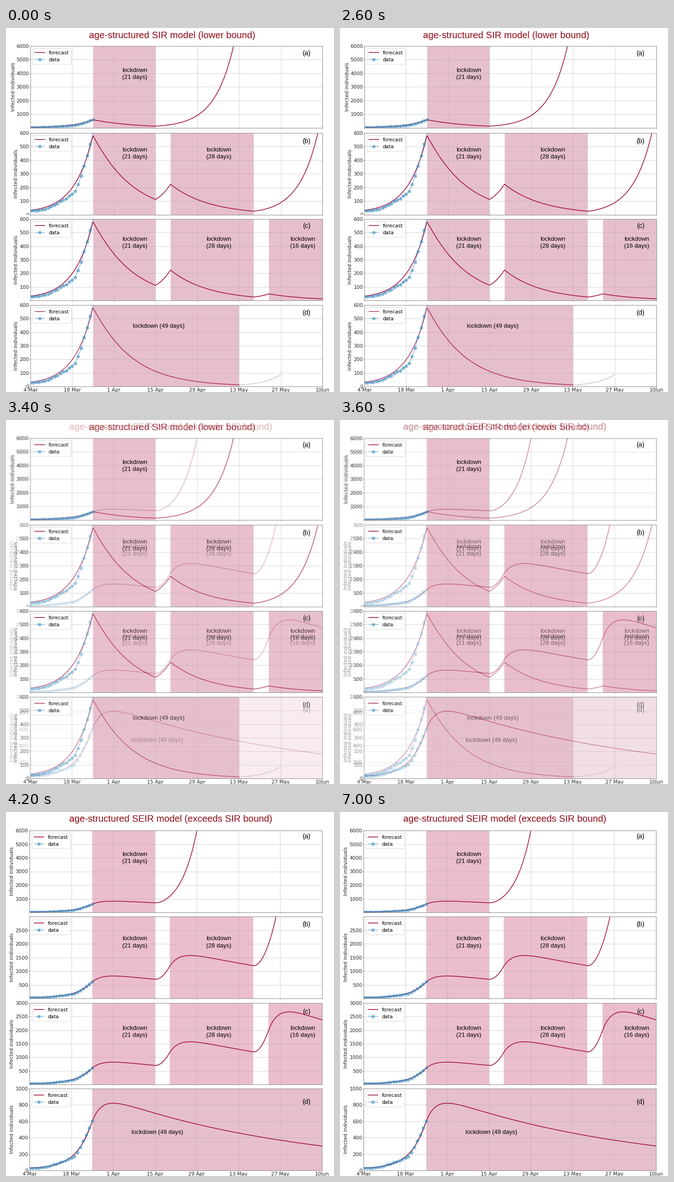
Recreate the animation shown at these times as a matplotlib script. Size 711 by 787 pixels, loop 7.2 s.

```python
import matplotlib.pyplot as plt
import numpy as np
from matplotlib.animation import FuncAnimation
from matplotlib.patches import Rectangle

W, H, DPI = 711, 787, 64
PT = 72 / DPI  # points per pixel
FRAMES, STEP = 72, 100
FADE_START, FADE_LENGTH = 3100, 1000

CRIMSON, BLUE, TITLE_RED, INK = "#a00f42", "#348abd", "#8e0814", "#222222"
PINK, ROSE = "#e6bfcd", "#ebbecc"
SMALL = 10.7 * PT

DATES = ["4 Mar", "18 Mar", "1 Apr", "15 Apr", "29 Apr", "13 May", "27 May", "10Jun"]
CASES = [28, 28, 29, 31, 36, 40, 48, 59, 71, 79, 97, 108, 116, 137,
         150, 172, 222, 283, 360, 434, 519, 606]

# Phase: (last day, growth rate, share of the main mode, decay of the rest)
SIR = [(21, .1555, .69, .1), (42, -.0812, 1.06, .3), (47, .156, .91, .3),
       (75, -.0782, 1, 0), (80, .154, .88, .3), (98, -.0782, 1, 0)]
SEIR = [(21, .19, .366, .05), (42, -.0152, 1.605, .3), (47, .182, .662, .4),
        (75, -.0152, 1.554, .3), (80, .172, .674, .4), (98, -.0152, 1.595, .3)]

fig = plt.figure(figsize=(W / DPI, H / DPI), dpi=DPI, facecolor="white")


def infected(start, phases):
    """Join exponential phases into one continuous curve."""
    days, values, day = [], [], 0
    for end, rate, share, decay in phases:
        t = np.linspace(0, end - day, 120)
        y = start * (share * np.exp(rate * t) + (1 - share) * np.exp(-decay * t))
        days.append(t + day)
        values.append(y)
        day, start = end, y[-1]
    return np.concatenate(days), np.concatenate(values)


def stretch(phases, count, end=98):
    """Keep the first phases and let the last one run on to the end day."""
    return phases[:count - 1] + [(end,) + phases[count - 1][1:]]


def label(x, y, text, size=13, color="black", **kw):
    fig.text(x / W, 1 - y / H, text, fontsize=size * PT, color=color, ha="center",
             **{"family": "Liberation Sans", "va": "baseline", **kw})


def lockdown(x, y, days):
    label(x, y, "lockdown")
    label(x, y + 15, f"({days} days)")


def panel(left, right, top, bottom, ymax, ticks, curve, spans, shade,
          name_x, tag, tag_y, dates=False, alpha=1):
    ax = fig.add_axes([left / W, 1 - bottom / H, (right - left) / W, (bottom - top) / H])
    for start, end in spans:
        ax.axvspan(start, end, facecolor=shade, edgecolor="none")
    ax.plot(*curve, color=CRIMSON, lw=1.6 * PT, alpha=alpha, label="forecast")
    ax.plot(range(22), CASES, "o-", color=BLUE, alpha=.55, lw=1.5 * PT,
            ms=6 * PT, mew=PT, label="data")
    ax.set(xlim=(0, 98), ylim=(0, ymax))
    ax.set_xticks(range(0, 99, 14), DATES if dates else [""] * 8)
    ax.set_yticks(ticks)
    ax.tick_params(length=2 * PT, width=.8 * PT, pad=PT, labelsize=SMALL,
                   color="#777777", labelcolor=INK)
    ax.grid(color="#a8a8a8", alpha=.55, lw=.9 * PT)
    for spine in ax.spines.values():
        spine.set(color="#858585", linewidth=PT)
    ax.legend(loc="upper left", fontsize=SMALL)
    label(name_x, (top + bottom) / 2, "Infected individuals", 10.7, INK,
          rotation=90, va="center", family="DejaVu Sans")
    label(651.5, tag_y, f"({tag})", 14.5)
    return ax


def snapshot():
    """Render the figure, return its pixels and empty it."""
    fig.canvas.draw()
    pixels = np.asarray(fig.canvas.buffer_rgba())[..., :3].astype(float)
    fig.clear()
    return pixels


FIRST, SECOND, THIRD = (21, 42), (47, 75), (80, 98)


def sir_scene():
    label(360.5, 22, "age-structured SIR model (lower bound)", 20.3, TITLE_RED)
    panel(53, 686, 39, 215.5, 6000, range(1000, 6001, 1000),
          infected(32, stretch(SIR, 3)), [FIRST], PINK, 16, "a", 59)
    panel(53, 686, 227, 403.5, 600, range(0, 601, 100),
          infected(32, stretch(SIR, 5)), [FIRST, SECOND], PINK, 22, "b", 249)
    # The lowest tick label of this panel is cut off.
    fig.add_artist(Rectangle((0, 1 - 408.5 / H), 50 / W, 4.2 / H, color="white", lw=0,
                             transform=fig.transFigure, zorder=2))
    panel(53, 686, 413, 589, 600, range(100, 601, 100),
          infected(32, SIR), [FIRST, SECOND, THIRD], PINK, 22, "c", 432)
    days, values = infected(32, stretch(SIR, 2, 70))
    ax = panel(53, 686, 599, 775, 600, range(0, 601, 100), (days, values),
               [(21, 70)], PINK, 22, "d", 620, dates=True, alpha=.8)
    t, y = infected(values[-1], [(14, .1555, .85, .3)])
    ax.plot(t + 70, y, ":", color="#707070", lw=1.5 * PT)

    lockdown(279.5, 95, 21)
    for y in (266.7, 460.4):
        lockdown(279.5, y, 21)
        lockdown(461, y, 28)
    lockdown(643, 460.4, 16)
    label(331, 648, "lockdown (49 days)")


def seir_scene():
    label(357, 21, "age-structured SEIR model (exceeds SIR bound)", 20.3, TITLE_RED)
    panel(51, 685, 40, 217, 6000, range(1000, 6001, 1000),
          infected(30, stretch(SEIR, 3)), [FIRST], ROSE, 13, "a", 57)
    panel(51, 685, 226, 403, 3000, range(500, 2501, 500),
          infected(30, stretch(SEIR, 5)), [FIRST, SECOND], ROSE, 13, "b", 247)
    panel(51, 685, 413, 589, 3000, range(500, 3001, 500),
          infected(30, SEIR), [FIRST, SECOND, THIRD], ROSE, 13, "c", 436)
    panel(51, 685, 598, 775, 1000, range(0, 1001, 200),
          infected(30, stretch(SEIR, 2)), [(21, 98)], PINK, 13, "d", 631, dates=True)

    lockdown(279.5, 95.2, 21)
    for y in (277.5, 471.4):
        lockdown(279.5, y, 21)
        lockdown(461, y, 28)
    lockdown(643, 471.4, 16)
    label(328.5, 696, "lockdown (49 days)")


sir_scene()
before = snapshot()
seir_scene()
after = snapshot()

stage = fig.add_axes([0, 0, 1, 1])
stage.axis("off")
view = stage.imshow(before.astype(np.uint8), aspect="auto", interpolation="nearest")


def update(i):
    p = np.clip((i * STEP - FADE_START) / FADE_LENGTH, 0, 1)
    view.set_data(((1 - p) * before + p * after).round().astype(np.uint8))
    return [view]


anim = FuncAnimation(fig, update, frames=FRAMES, interval=STEP, repeat=True, repeat_delay=0)
plt.show()
```
